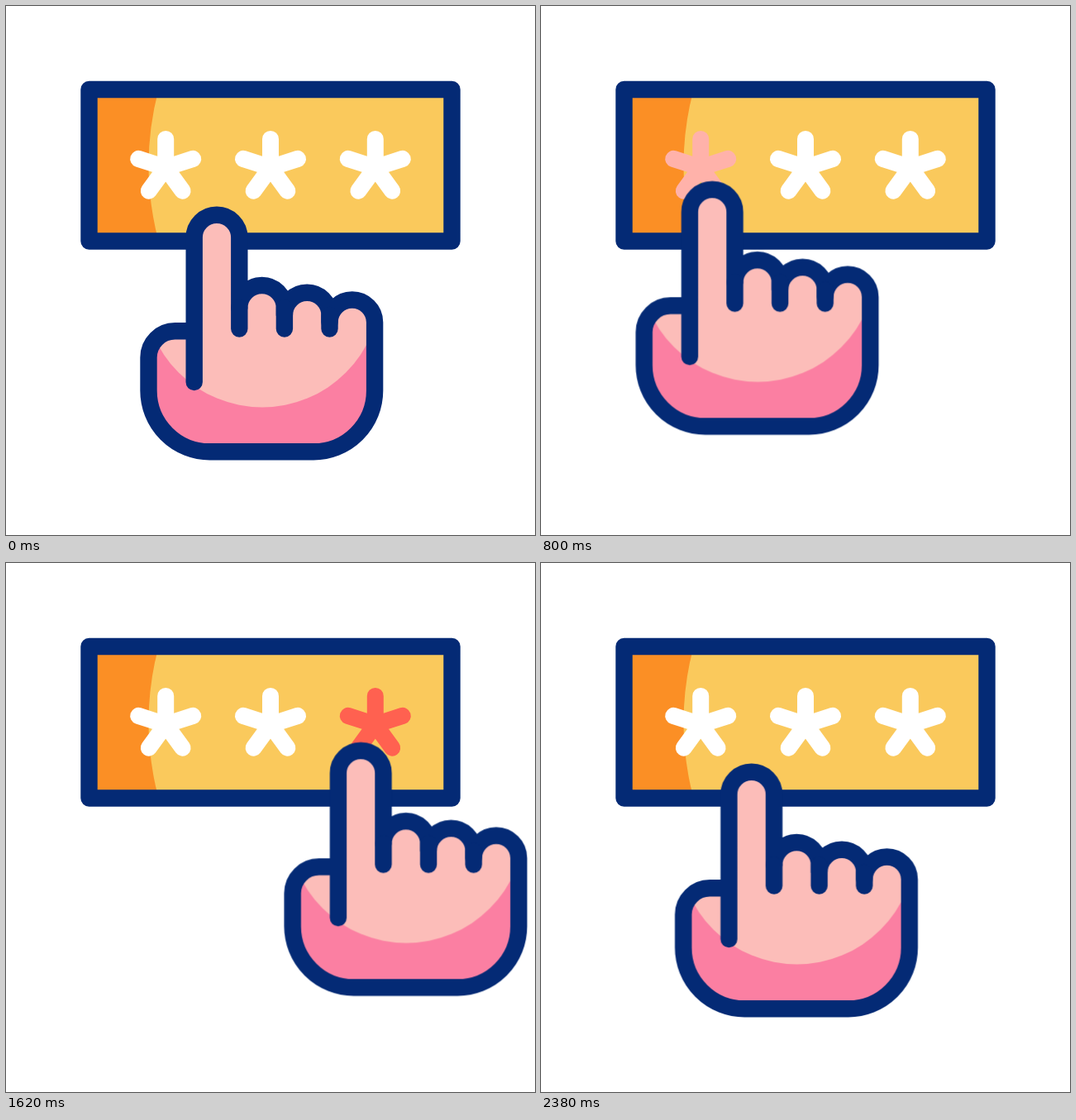
Write an HTML page that moves like this. It is 640 px wide and 640 px high and loops after 2400 ms.

```html
<!DOCTYPE html>
<html lang="en">
<head>
<meta charset="utf-8">
<title>Entering a passcode</title>
<style>
  html, body { margin: 0; width: 100%; height: 100%; overflow: hidden; background: #fff; }
  svg { display: block; width: 100%; height: 100%; }
  .line { fill: none; stroke: #042a75; stroke-width: 20.4; stroke-linecap: round; stroke-linejoin: round; }
  .star { fill: none; stroke: #fff; stroke-width: 20; stroke-linecap: round; }
</style>
</head>
<body>
<svg viewBox="0 0 640 640">
  <defs>
    <path id="palm" d="M227.7 455V280A27.3 27.3 0 0 1 282.3 280V365.3A27.3 27.3 0 0 1 336.9 365.3V374A27.3 27.3 0 0 1 391.5 374V382.7A27.3 27.3 0 0 1 446.1 382.7V465.3A74 74 0 0 1 372.1 539.3H246.5A74 74 0 0 1 172.5 465.3V425.3A32 32 0 0 1 204.5 393.3H227.7"/>
    <clipPath id="inPalm"><use href="#palm"/></clipPath>
  </defs>

  <rect x="100.5" y="101" width="439" height="183.5" fill="#fac95c"/>
  <path d="M100.5 101H184.5Q160.5 192.8 184.5 284.5H100.5Z" fill="#fb8f25"/>
  <rect class="line" x="100.5" y="101" width="439" height="183.5"/>

  <g id="stars"></g>

  <g id="hand">
    <use href="#palm" fill="#fb7fa2"/>
    <circle cx="310" cy="342.5" r="143" fill="#fcbdb9" clip-path="url(#inPalm)"/>
    <use href="#palm" class="line"/>
    <path class="line" d="M282.3 365V390.5M336.9 365V390.5M391.5 374V390.5"/>
  </g>
</svg>
<script>
const LOOP = 2400;
const RED = '#ff6150', WHITE = '#fff';
const EASE = 'cubic-bezier(.5, 0, .5, 1)';

// Each step: [ms, value, easing towards the next step]
function play(el, prop, steps) {
  const frames = steps.map(([ms, value, easing = 'linear']) =>
    ({ offset: ms / LOOP, [prop]: value, easing }));
  el.animate(frames, { duration: LOOP, iterations: Infinity });
}

function starPath(cx, cy, r) {
  return [-90, -18, 54, 126, 198].map(deg => {
    const a = deg * Math.PI / 180;
    return `M${cx} ${cy}L${cx + r * Math.cos(a)} ${cy + r * Math.sin(a)}`;
  }).join('');
}

// x centre, then the times of turning red and back to white
const stars = [
  [193.2, 410, 500, 760, 840],
  [320, 970, 1060, 1300, 1380],
  [446.8, 1530, 1620, 1820, 1900],
];
for (const [cx, on, lit, off, out] of stars) {
  const star = document.createElementNS('http://www.w3.org/2000/svg', 'path');
  star.setAttribute('class', 'star');
  star.setAttribute('d', starPath(cx, 195.6, 34.7));
  document.getElementById('stars').append(star);
  play(star, 'stroke', [
    [0, WHITE], [on, WHITE], [lit, RED], [off, RED], [out, WHITE], [LOOP, WHITE],
  ]);
}

const at = (x, y) => `translate(${x}px, ${y}px)`;
const rest = at(0, 0);
const first = at(-56.4, -30.7);
const second = at(72.9, -30.7);
const third = at(174.2, -25.7);
const gone = at(506.5, -30.5);
const back = at(-470, 74);

play(document.getElementById('hand'), 'transform', [
  [0, rest], [200, rest, EASE],
  [485, first], [740, first, EASE],
  [1040, second], [1280, second, EASE],
  [1600, third], [1800, third, EASE],
  [2000, gone], [2050, gone],
  [2050, back], [2085, back, EASE],
  [2388, rest], [LOOP, rest],
]);
</script>
</body>
</html>
```
